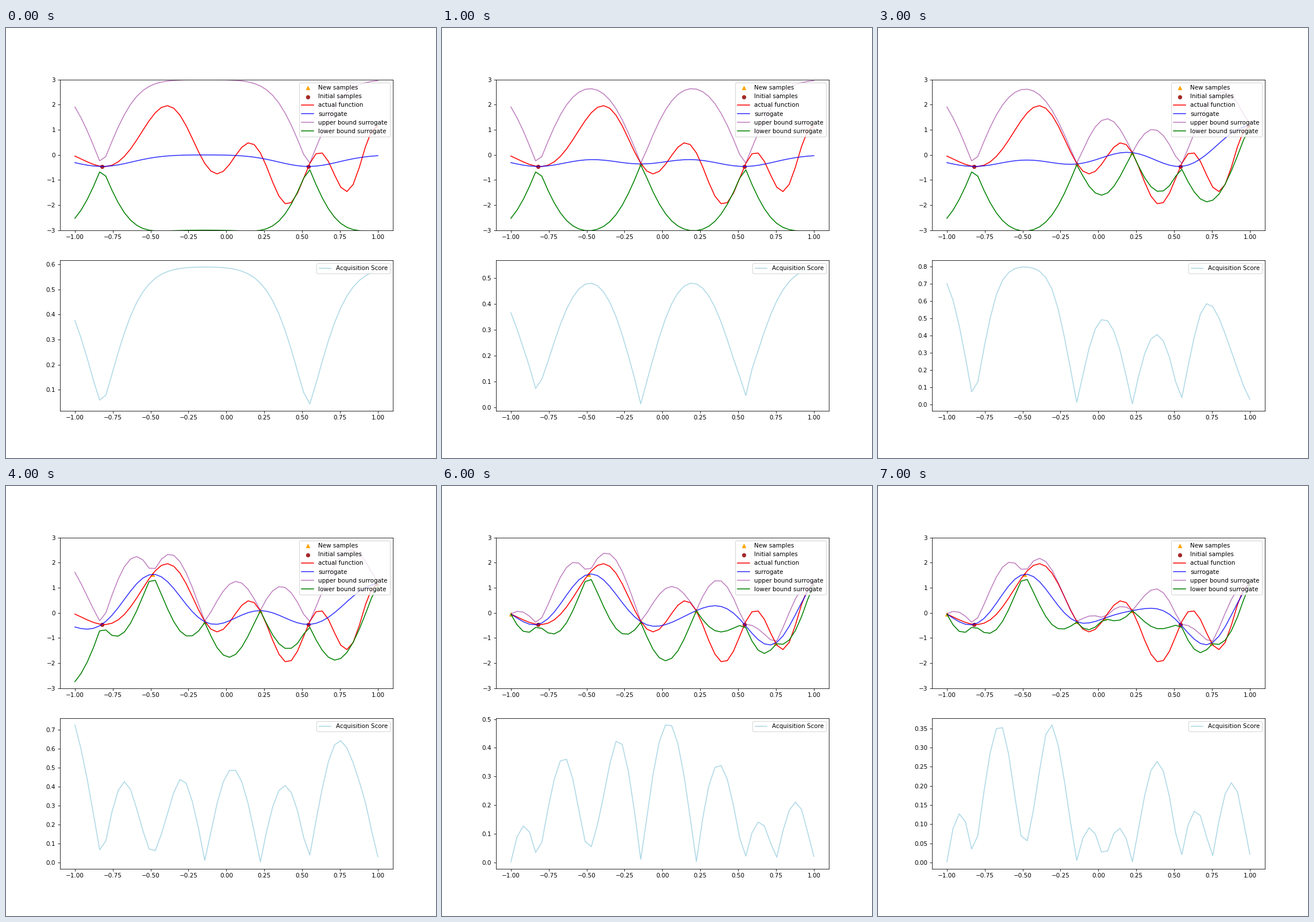
These frames come from a looping animation (748x748 px, 8000 ms). A matplotlib script:

```python
import math

import numpy as np
import matplotlib.pyplot as plt
from matplotlib.animation import FuncAnimation

LENGTH, NOISE, XI = 0.2, 1e-6, 0.1

grid = np.linspace(-1, 1, 50)
initial = np.array([-0.822, 0.542])
picked = np.array([-0.1403, 0.9938, 0.2237, -0.4885, -0.9992, 0.747, 0.0398])


def objective(x):
    return np.sin(3 * (x + 2) ** 2) - np.sin(10 * x / 3)


def kernel(a, b):
    return np.exp(-(a[:, None] - b[None, :]) ** 2 / (2 * LENGTH ** 2))


def surrogate(xs):
    """Posterior mean and deviation of a Gaussian process on the grid."""
    cov = kernel(xs, xs) + NOISE * np.eye(len(xs))
    cross = kernel(grid, xs)
    mean = cross @ np.linalg.solve(cov, objective(xs))
    var = 1 - np.sum(cross * np.linalg.solve(cov, cross.T).T, axis=1)
    return mean, np.sqrt(np.maximum(var, NOISE))


def acquisition(mean, dev, best):
    """Gain where improvement is likely, deviation where it is not."""
    gain = mean - best - XI
    prob = np.array([0.5 * (1 + math.erf(z / math.sqrt(2)))
                     for z in gain / dev])
    return gain * prob + dev * (1 - prob)


fig, (top, bottom) = plt.subplots(2, 1, figsize=(10, 10), dpi=74.8)

new_dots = top.scatter([], [], marker="^", color="orange", label="New samples")
top.scatter(initial, objective(initial), color="brown",
            label="Initial samples")
top.plot(grid, objective(grid), color="red", label="actual function")
mean_line, = top.plot([], [], color="blue", alpha=0.8, label="surrogate")
upper_line, = top.plot([], [], color="purple", alpha=0.5,
                       label="upper bound surrogate")
lower_line, = top.plot([], [], color="green", label="lower bound surrogate")
top.set(xlim=(-1.1, 1.1), ylim=(-3, 3))
top.legend(loc="upper right")

score_line, = bottom.plot([], [], color="lightblue", label="Acquisition Score")
bottom.set_xlim(-1.1, 1.1)
bottom.legend(loc="upper right")


def update(step):
    new = picked[:step]
    xs = np.concatenate([initial, new])
    mean, dev = surrogate(xs)
    new_dots.set_offsets(np.column_stack([new, objective(new)]))
    mean_line.set_data(grid, mean)
    upper_line.set_data(grid, mean + 3 * dev)
    lower_line.set_data(grid, mean - 3 * dev)

    score = acquisition(mean, dev, objective(xs).max())
    score_line.set_data(grid, score)
    pad = 0.05 * np.ptp(score)
    bottom.set_ylim(score.min() - pad, score.max() + pad)


anim = FuncAnimation(fig, update, frames=len(picked) + 1, interval=1000,
                     init_func=lambda: update(0), repeat=True, repeat_delay=0)
plt.show()
```
